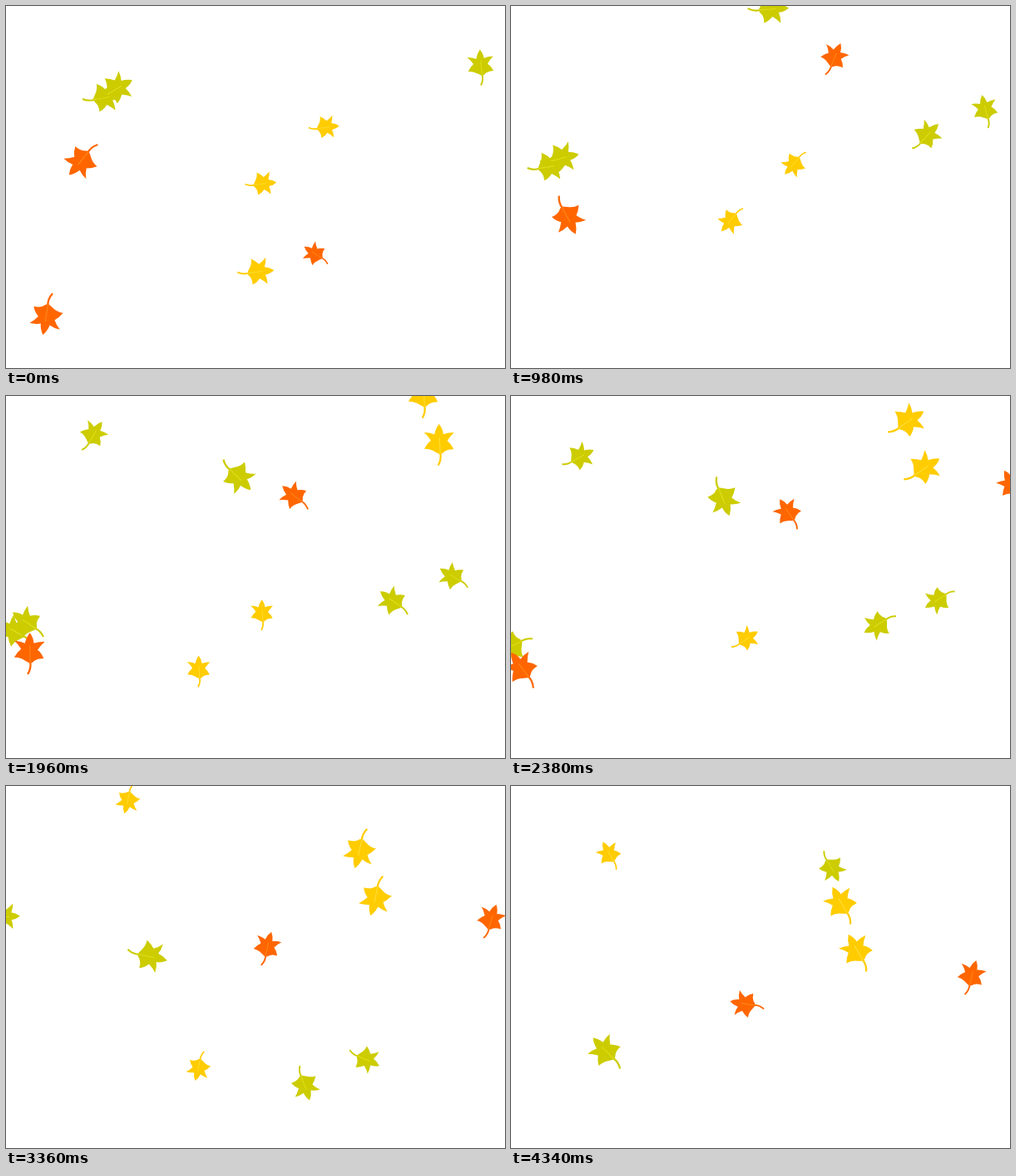
Animation, 600 px wide and 436 px high, one loop 4480 ms. Source, as an HTML page with a canvas:

```html
<!DOCTYPE html>
<html lang="en">
<head>
<meta charset="utf-8">
<title>Falling leaves</title>
<style>
  html, body { margin: 0; width: 100%; height: 100%; overflow: hidden; background: #fff; }
  canvas { display: block; }
</style>
</head>
<body>
<canvas id="stage" width="600" height="436"></canvas>
<script>
const ctx = document.getElementById('stage').getContext('2d');
const STEP = 140, STEPS = 32;
const rad = deg => deg * Math.PI / 180;

// Upright leaf, 44 units from tip to stalk end, origin halfway.
const BLADE = new Path2D(
  'M0-22 Q4-17 4.6-11.2 Q10-13.2 16-13 Q12-9.4 8.8-4.2 Q13.4-.8 15.6 4.8 ' +
  'Q10 4.6 6.4 7 Q4 9.6 1.5 10.5 Q-1 9.2-4 7.6 Q-9 4.2-15.6 4.6 Q-12.6-1-8.6-4.4 ' +
  'Q-11.6-9.4-16-13 Q-10-13-4.8-10.8 Q-3.8-17 0-22Z');
const STALK = new Path2D('M1.4 8 Q3.2 15.5-.6 22');
const VEIN = new Path2D('M.4-8 Q1.2 1 1.5 10');

// A leaf that rocks back and forth while it slowly turns; `crest` is the height of its fastest rock.
const rocking = (spin, crest) => (leaf, t, kind) => {
  const k = t - (crest - leaf.y) / kind.fall;
  return leaf.tilt + spin * k + 75 * Math.sin(rad(k * 360 / 28));
};
const spinning = (leaf, t) => 176 + 19.6 * t;

// Every colour drifts steadily left and down, and circles around that line.
const GREEN = {
  fill: '#cccc00', vein: '#dede1c', drift: -8.4, fall: 13, radius: 16,
  orbit: t => 150 - (t < 7 ? 8.4 : 16.5) * Math.abs(t - 7),
  heading: rocking(-6, 72)
};
const YELLOW = {
  fill: '#ffcc00', vein: '#ffdc33', drift: -6.2, fall: 8.6, radius: 9,
  orbit: t => 121 + 19.6 * t,
  heading: spinning
};
const ORANGE = {
  fill: '#ff6600', vein: '#ff8519', drift: -4.25, fall: 8.25, radius: 6,
  orbit: t => 16 * t - 82,
  heading: rocking(-7, 156)
};

const leaf = (kind, size, x, y, tilt) => ({ kind, size, x, y, tilt });
const leaves = [
  leaf(GREEN, 1.08, 116, 94, 156),
  leaf(GREEN, 1.08, 131, 84, 143),
  leaf(GREEN, .98, 571, 58, 99),
  leaf(GREEN, .92, 643, 28, 46),
  leaf(GREEN, 1.12, 382, -96, 216),
  leaf(GREEN, .95, 208, -143, 150),
  leaf(GREEN, .93, 652, -321, 235),
  leaf(YELLOW, .84, 387, 138),
  leaf(YELLOW, .86, 311, 206),
  leaf(YELLOW, 1, 305, 312),
  leaf(YELLOW, 1.13, 581, -124),
  leaf(YELLOW, 1.13, 600, -67),
  leaf(YELLOW, .85, 302, -184),
  leaf(ORANGE, 1.14, 92, 191, 281),
  leaf(ORANGE, 1.16, 49, 377, 130),
  leaf(ORANGE, .8, 372, 306, 224),
  leaf(ORANGE, .95, 412, 3, 74),
  leaf(ORANGE, .98, 681, -30, 96)
];

function drawLeaf(leaf, t) {
  const { kind, size } = leaf, around = rad(kind.orbit(t));
  const x = leaf.x + kind.drift * t + kind.radius * Math.cos(around);
  const y = leaf.y + kind.fall * t + kind.radius * Math.sin(around);
  const ground = 300 + 63 * size; // larger leaves are nearer and land lower
  if (y < 0 || y > ground) return;

  ctx.save();
  ctx.translate(x, y);
  ctx.rotate(rad(kind.heading(leaf, t, kind) - 90));
  ctx.scale(size, size);
  ctx.fillStyle = ctx.strokeStyle = kind.fill;
  ctx.fill(BLADE);
  ctx.lineWidth = 2;
  ctx.stroke(STALK);
  ctx.strokeStyle = kind.vein;
  ctx.lineWidth = 1.1;
  ctx.stroke(VEIN);
  ctx.restore();
}

function render(now) {
  const t = Math.floor(now / STEP) % STEPS;
  ctx.fillStyle = '#fff';
  ctx.fillRect(0, 0, 600, 436);
  for (const item of leaves) drawLeaf(item, t);
}

const begin = performance.now();
function loop() {
  render(performance.now() - begin);
  requestAnimationFrame(loop);
}
loop();
</script>
</body>
</html>
```
